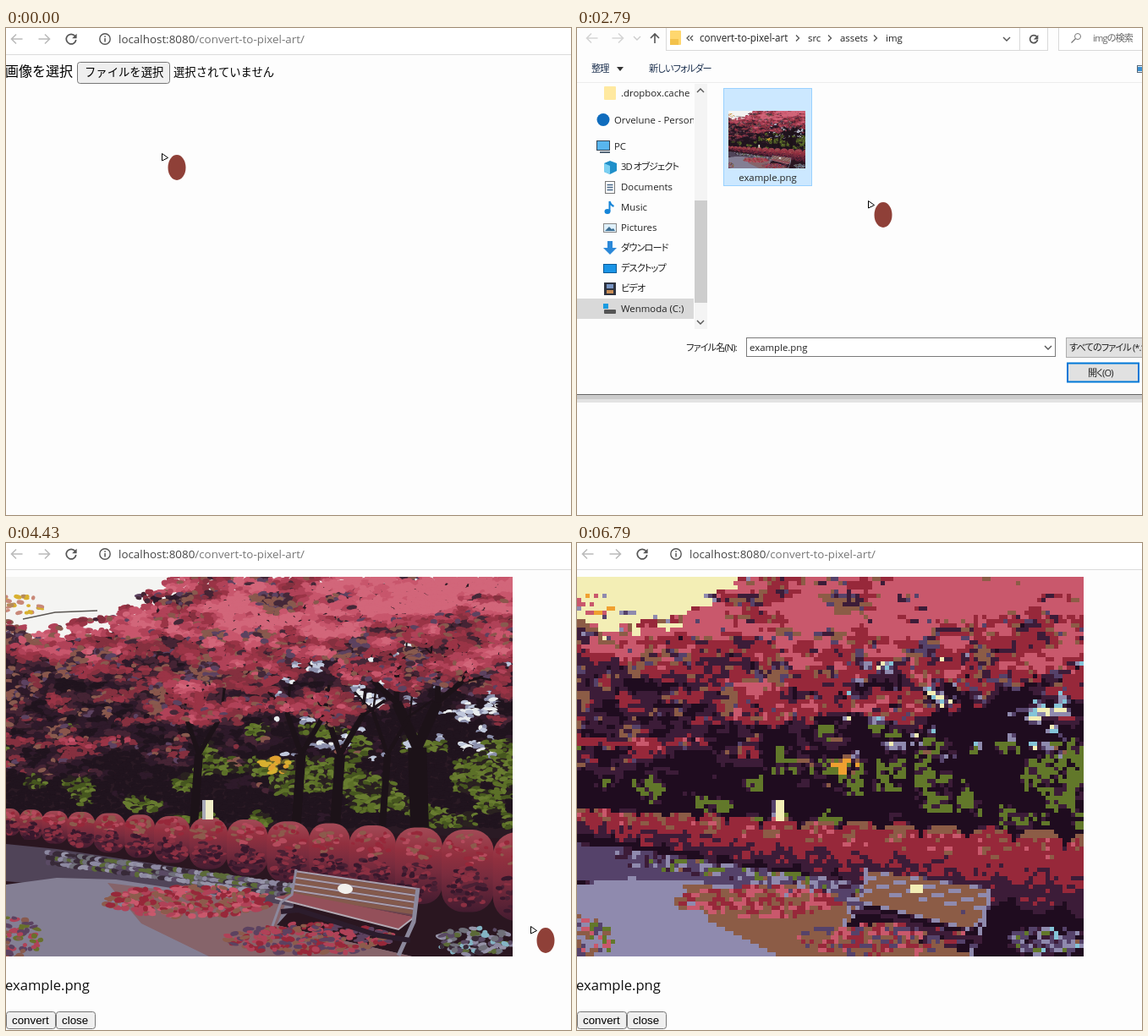
Recreate the animation shown at these times as an HTML page with a canvas. Size 668 by 576 pixels, loop 7040 ms.

```html
<!DOCTYPE html>
<html lang="ja">
<head>
<meta charset="utf-8">
<title>Pixel art converter</title>
<style>
html, body { margin: 0; width: 100%; height: 100%; overflow: hidden; background: #fdfdfd; }
#stage { position: relative; width: 668px; height: 576px; overflow: hidden; background: #fdfdfd; }
#stage > *, #dialog > * { position: absolute; left: 0; top: 0; }
svg { overflow: visible; font-family: "Open Sans", "Noto Sans CJK JP", "Noto Sans CJK", sans-serif; }
.ui { font-family: "Liberation Sans", "Noto Sans CJK JP", sans-serif; }
.tight { letter-spacing: -.9px; font-feature-settings: "palt"; }
#stage > canvas { top: 40px; width: 599px; height: 449px; }
#pixels { image-rendering: pixelated; }
#dialog { width: 668px; height: 576px; transform-origin: 302px 177px; }
#dialog > #thumb { left: 179px; top: 98px; width: 91px; height: 68px; }
</style>
</head>
<body>
<div id="stage">
  <svg id="page" width="668" height="576"></svg>
  <canvas id="photo" width="599" height="449"></canvas>
  <canvas id="pixels" width="120" height="90"></canvas>
  <div id="dialog">
    <svg id="shell" width="668" height="576"></svg>
    <svg id="body" width="668" height="576"></svg>
    <canvas id="thumb" width="182" height="136"></canvas>
  </div>
  <svg id="pointer" width="40" height="40">
    <path d="M.5 .5V9L7.5 5.5Z" fill="#fff" stroke="#000"/>
    <ellipse cx="18" cy="17" rx="10.5" ry="15" fill="#8f4038"/>
  </svg>
</div>
<script>
const $ = id => document.getElementById(id);

// ---------- markup helpers ----------
const text = (x, y, s, size = 11.4, fill = '#222', extra = '') =>
  `<text x="${x}" y="${y + size * .36}" font-size="${size}" fill="${fill}" ${extra}>${s}</text>`;
const kana = (x, y, s, fill) => text(x, y, s, 11.2, fill, 'class="tight"');
const rect = (x, y, w, h, fill, extra = '') =>
  `<rect x="${x}" y="${y}" width="${w}" height="${h}" fill="${fill}" ${extra}/>`;
const box = (x, y, w, h, fill, line, r = 0, extra = '') =>
  rect(x + .5, y + .5, w - 1, h - 1, fill, `stroke="${line}" rx="${r}" ${extra}`);
const line = (d, color, w = 1.3) => `<path d="${d}" fill="none" stroke="${color}" stroke-width="${w}"/>`;
const arrow = (x, y, dir, color, r = 6.5) =>
  line(`M${x - r} ${y}h${2 * r}M${x + dir * (r - 5.5)} ${y - 5.5}l${dir * 5.5} 5.5l${-dir * 5.5} 5.5`, color, 1.6);
const next = (x, y) => line(`M${x - 2} ${y - 3.5}l3.5 3.5l-3.5 3.5`, '#555');
const vee = (x, y, up, color = '#555', w = 1.4) =>
  line(`M${x - 4} ${y + (up ? 2 : -2)}l4 ${up ? -4 : 4}l4 ${up ? 4 : -4}`, color, w);
const reload = (x, y, r, color) =>
  line(`M${x + r * .8} ${y - r * .6}A${r} ${r} 0 1 0 ${x + r} ${y + 1}`, color, 1.7) +
  `<path d="M${x + r + .8} ${y - r - .5}v5.5h-5.5z" fill="${color}"/>`;
const button = (id, x, y, w, h, label, pad) =>
  box(x, y, w, h, '#efefef', '#767676', 3, `id="${id}"`) +
  text(x + pad, y + h / 2 - .3, label, 13.33, '#000', 'class="ui"');

// ---------- browser page ----------
$('page').innerHTML =
  rect(0, 0, 668, 31, '#fff') + rect(0, 31, 668, 1, '#dcdcdc') +
  arrow(13, 13, -1, '#bbb') + arrow(45, 13, 1, '#bbb') + reload(77, 13, 5.8, '#555') +
  '<circle cx="117" cy="13" r="6.2" fill="none" stroke="#555" stroke-width="1.4"/>' +
  rect(116.3, 12, 1.5, 4.5, '#555') + rect(116.3, 9.3, 1.5, 1.6, '#555') +
  text(133, 13, 'localhost:8080<tspan fill="#777">/convert-to-pixel-art/</tspan>', 13.4, '#444') +
  '<g id="form">' + text(-1, 51, '画像を選択', 16, '#000') +
  button('choose', 84, 40, 110, 26, 'ファイルを選択', 9) +
  text(198, 52.5, '選択されていません', 13.33, '#000') + '</g>' +
  '<g id="result">' + text(-1, 523, 'example.png', 16.6, '#111') +
  button('convert', 0, 554, 59, 21, 'convert', 7) + button('close', 59, 554, 47, 21, 'close', 7) + '</g>';

// ---------- file dialog ----------
$('shell').innerHTML =
  rect(-1, 425, 1000, 18, '#000', 'opacity=".1"') + rect(-1, 425, 1000, 14, '#000', 'opacity=".1"') +
  box(-2, -60, 1000, 494, '#fff', '#666') + rect(-1, 357, 990, 76, '#e9e9e9') +
  rect(139, 66, 16, 291, '#eaeaea') + rect(139, 204, 15, 121, '#bcbcbc') +
  vee(146, 74, true, '#333', 2) + vee(146, 348, false, '#333', 2) +
  rect(128, 368, 68, 19, '#fff') + rect(200, 364, 368, 26, '#fff') +
  rect(577, 364, 100, 25, '#fff') + rect(577, 394, 90, 26, '#fff');

const icons = [
  rect(32, 69, 14, 16, '#ffe9a0', 'rx="1"'),
  '<circle cx="31" cy="108.5" r="7.5" fill="#0f6cbd"/>',
  box(23, 133, 16, 12, '#58b5ee', '#345') + rect(27, 146, 12, 2, '#567'),
  '<path d="M32 160l7-3 8 3v9l-8 4-7-3z" fill="#1f8fc9"/><path d="M32 160l7 3v10l-7-3z" fill="#7cd0f2"/>',
  box(33, 181, 12, 15, '#fff', '#777') + line('M35.5 185.5h7m-7 3h7m-7 3h7', '#468'),
  '<ellipse cx="36" cy="217" rx="3.5" ry="3" fill="#1685d8"/>' + line('M38.5 217V205q1 4 5 6', '#1685d8', 2),
  box(31, 231, 16, 11, '#dff0fa', '#888') + '<path d="M33 240l5-5 3 3 2-1 2 3z" fill="#3c6f94"/>',
  '<path d="M36 252h6v8h5l-8 8-8-8h5z" fill="#2b88d8"/>',
  box(31, 279, 16, 11, '#1a94e6', '#0b5c99'),
  rect(32, 301, 14, 15, '#2f3440') + rect(35, 303, 8, 5, '#7895c4') + rect(35, 310, 8, 4, '#c98d55'),
  rect(32, 333, 14, 5, '#555', 'rx="1"') + rect(31, 326, 6, 6, '#1a9be0')
];
const rows = ['.dropbox.cache', 'Orvelune - Personal', 'PC', '3D オブジェクト', 'Documents', 'Music',
  'Pictures', 'ダウンロード', 'デスクトップ', 'ビデオ', 'Wenmoda (C:)'];
const rowX = i => i == 1 || i == 2 ? 44 : 52;
const rowY = i => i < 3 ? 77 + 31.5 * i : 92 + 24 * i;
const tree = rows.map((s, i) => icons[i] +
  (/[ァ-ー]/.test(s) ? kana(rowX(i), rowY(i), s) : text(rowX(i), rowY(i), s))).join('');

$('body').innerHTML =
  rect(-1, -59, 990, 492, '#fdfdfd') +
  arrow(18, 12, -1, '#d5d5d5') + arrow(48, 12, 1, '#d5d5d5') + vee(71, 12, false, '#ccc') +
  line('M92 18V7M87 12l5-5 5 5', '#555', 1.6) +
  box(105, -8, 452, 35, '#fff', '#d9d9d9') + rect(523, 0, 1, 26, '#d9d9d9') +
  rect(110, 3, 13, 17, '#ffd76e', 'rx="1"') + rect(110, 13, 10, 7, '#f3c24b') +
  line('M133 9l-3 3 3 3M137 9l-3 3 3 3', '#555') +
  text(145, 12, 'convert-to-pixel-art', 11.7) + next(261, 12) + text(273, 12, 'src') +
  next(299, 12) + text(311, 12, 'assets') + next(353, 12) + text(365, 12, 'img') +
  vee(508, 13) + reload(540, 13, 4.5, '#555') +
  box(569, -8, 300, 35, '#fff', '#d9d9d9') +
  '<circle cx="592" cy="10" r="3.5" fill="none" stroke="#777"/>' + line('M589.5 12.5l-5 5', '#777') +
  kana(610, 12, 'imgの検索', '#666') +
  kana(17, 48, '整理', '#1e3250') + '<path d="M47 46h8l-4 5z" fill="#333"/>' +
  kana(85, 48, '新しいフォルダー', '#1e3250') +
  box(662, 44, 14, 9, '#eaf3fb', '#567') + rect(663, 46, 5, 5, '#3c8fd0') + rect(0, 64, 700, 1, '#ececec') +
  rect(0, 320, 138, 24, '#d9d9d9') +
  `<clipPath id="side"><path d="M0 60H138V356H0z"/></clipPath><g clip-path="url(#side)">${tree}</g>` +
  rect(139, 66, 15, 290, '#f4f4f4') + rect(139, 204, 15, 121, '#cdcdcd') +
  vee(146, 74, true) + vee(146, 348, false) +
  box(173, 71, 105, 116, '#cce8ff', '#99d1ff', 0, 'id="mark"') +
  text(225.5, 177, 'example.png', 11.4, '#222', 'text-anchor="middle"') +
  kana(129, 378, 'ファイル名(N):') + box(200, 366, 366, 23, '#fff', '#7a7a7a') +
  rect(203, 370, 70, 16, '#0078d7', 'id="sel"') +
  text(204, 378, 'example.png', 11.4, '#222', 'id="name"') + vee(557, 378) +
  box(578, 366, 120, 24, '#e1e1e1', '#adadad') + kana(582, 378, 'すべてのファイル (*.*)') +
  rect(580, 396.5, 84, 22, '#e1e1e1', 'stroke="#0078d7" stroke-width="2"') + kana(604, 407.5, '開く(O)');

// ---------- autumn park picture ----------
const g = $('photo').getContext('2d');
g.translate(0, -40);

let seed = 11;
function rnd() {
  seed = seed + 0x6D2B79F5 | 0;
  let v = Math.imul(seed ^ seed >>> 15, 1 | seed);
  v = v + Math.imul(v ^ v >>> 7, 61 | v) ^ v;
  return ((v ^ v >>> 14) >>> 0) / 4294967296;
}
const pick = list => list[rnd() * list.length | 0];
const clamp = (v, lo = 0, hi = 1) => Math.min(hi, Math.max(lo, v));
const bell = (v, width) => Math.exp(-((v / width) ** 2));

// Smooth value noise
function hash(i, j) {
  const v = Math.sin(i * 127.1 + j * 311.7) * 43758.5453;
  return v - Math.floor(v);
}
function noise(x, y) {
  const i = Math.floor(x), j = Math.floor(y);
  const u = (x - i) ** 2 * (3 - 2 * (x - i)), v = (y - j) ** 2 * (3 - 2 * (y - j));
  const top = hash(i, j) * (1 - u) + hash(i + 1, j) * u;
  return top * (1 - v) + (hash(i, j + 1) * (1 - u) + hash(i + 1, j + 1) * u) * v;
}

const leaf = ['#20141e', '#2e1a2a', '#452434', '#85303f', '#9a3446', '#b04258', '#c8566c', '#d2667a'];
const muted = ['#885a4e', '#5c4260', '#8a564c', '#442838'];
const green = ['#5c7028', '#46561f', '#687c30', '#2a2220'];
const pale = ['#e8ecee', '#c0c8dc', '#8c90ac'];

function dab(x, y, color, size = 1) {
  g.fillStyle = color;
  g.beginPath();
  g.ellipse(x, y, size * (2.5 + rnd() * 4), size * (1.8 + rnd() * 1.6), (rnd() - .5) * .7, 0, 6.283);
  g.fill();
}
function scatter(x, y, rx, ry, colors, count, size) {
  while (count-- > 0) {
    const a = rnd() * 6.283, r = Math.sqrt(rnd());
    dab(x + Math.cos(a) * r * rx, y + Math.sin(a) * r * ry, pick(colors), size);
  }
}
function poly(color, ...p) {
  g.fillStyle = color;
  g.beginPath();
  for (let i = 0; i < p.length; i += 2) g.lineTo(p[i], p[i + 1]);
  g.fill();
}
function stroke(color, w, ...p) {
  g.strokeStyle = color;
  g.lineWidth = w;
  g.beginPath();
  for (let i = 0; i < p.length; i += 2) g.lineTo(p[i], p[i + 1]);
  g.stroke();
}

// Leaf brightness: darker downwards, two slanting sunlit boughs, a shaded right side
function light(x, y) {
  return .62 - (y - 60) / 330 +
    .36 * bell(y - 195 + .27 * x, 42) * clamp((x - 170) / 50) +
    .28 * bell(y - 252 + .2 * x, 24) + .3 * bell(x, 130) * bell(y - 115, 24) -
    .32 * bell(x - 510, 75) * bell(y - 235, 70) +
    (noise(x / 34, y / 13) - .5) * .65 + (noise(x / 11 + 50, y / 6) - .5) * .5;
}
const isSky = (x, y) => y < 102 - Math.max(0, x - 122) * .9 + (noise(x / 14, y / 9) - .5) * 36 && x < 200;

function leafColor(x, y, l) {
  const patch = noise(x / 30 + 90, y / 22);
  if (x > 320 && y > 105 && y < 255 && l < .35 && noise(x / 16 + 7, y / 10) > .72) return pick(pale);
  if (y > 215 && l < .3 && patch > .6) return pick(green);
  if (l > .25 && l < .75 && (patch > .7 || rnd() < .12)) return pick(muted);
  return leaf[clamp(Math.floor(l * 8), 0, 7)];
}
function canopy(bottom, least) {
  for (let y = 40; y < bottom; y += 4) {
    for (let x = 0; x < 604; x += 6) {
      const px = x + rnd() * 6, py = y + rnd() * 4, l = light(px, py);
      if (l > least && !isSky(px, py)) dab(px, py, leafColor(px, py, l));
    }
  }
}
function branch(x, y, angle, len, w) {
  if (w < 2) return;
  const ex = x + Math.cos(angle) * len, ey = y - Math.sin(angle) * len;
  stroke('#1c1218', w, x, y, ex, ey);
  for (const turn of [-.45, .4]) branch(ex, ey, angle + turn, len * .62, w * .55);
}
function trees() {
  g.fillStyle = '#f4f4f2';
  g.fillRect(0, 40, 600, 110);
  poly('#2a1a24', 200, 60, 600, 40, 600, 489, 0, 489, 0, 115, 110, 115);
  canopy(335, -9);
  scatter(15, 72, 30, 13, ['#d8b030', '#b48a5c', '#c98878'], 24, .8);
  stroke('#5a5652', 1.5, 20, 90, 58, 82, 108, 80);
  scatter(318, 263, 20, 9, ['#e0a030', '#d8b030', '#6c6428'], 24);
  branch(489, 337, 1.6, 95, 22);
  for (const x of [222, 343, 389, 445]) branch(x, 335, 1.5, 85, 8 + x % 5);
  canopy(215, .42);
}

function hedge() {
  poly('#2a1620', 0, 322, 600, 350, 600, 489, 0, 489);
  for (let a = -12; a < 600;) {
    const w = 22 + a * .07 + rnd() * 8, x = a + w / 2;
    const top = 314 + x * .046, h = 32 + x * .12;
    const fill = g.createLinearGradient(0, top, 0, top + h);
    fill.addColorStop(0, '#a24a56');
    fill.addColorStop(.3, '#92303f');
    fill.addColorStop(.55, '#7a2c3e');
    fill.addColorStop(1, '#441c30');
    g.fillStyle = fill;
    g.beginPath();
    g.roundRect(a, top, w + 1, h, w / 2.4);
    g.fill();
    scatter(x, top + h * .25, w * .42, h * .2, ['#b44a5c', '#8c5a4c', '#97283a'], w * .5, .8);
    scatter(x, top + h * .7, w * .42, h * .25, ['#8c3042', '#4a2034', '#38182c'], w, .8);
    a += w;
  }
  g.fillStyle = '#f0ecc8';
  g.fillRect(232, 304, 13, 23);
  g.fillStyle = '#a8a8b8';
  g.fillRect(232, 304, 4, 23);
}

function ground() {
  const stone = ['#8c88a0', '#9694a8', '#5c6a38', '#5a4a64', '#70707a', '#382a38'];
  poly('#504458', 0, 356, 60, 362, 340, 404, 340, 430, 0, 400);
  for (let x = 50; x < 345; x += 5) {
    for (let k = 0; k < 3; k++) dab(x, 366 + (x - 50) * .135 + k * 6, pick(stone));
  }
  poly('#847f94', 0, 404, 60, 396, 130, 398, 340, 430, 320, 452, 480, 489, 0, 489);
  poly('#86646a', 120, 402, 330, 428, 320, 452, 480, 489, 240, 489, 160, 450);
  scatter(215, 424, 100, 18, ['#c9586c', '#b04258', '#97283a', '#8c5c4c'], 330);
  scatter(360, 468, 100, 18, ['#8c5c4c', '#b04258', '#97283a', '#5c4260'], 260);
  scatter(8, 468, 34, 26, ['#885a4e', '#b04258', '#5c4260', '#68702c'], 90);
  scatter(555, 471, 45, 16, [...stone, '#84b4c4'], 110);
}

function bench() {
  poly('#6a4450', 342, 388, 487, 409, 483, 442, 338, 415);
  for (let i = 0; i < 4; i++) {
    stroke('#845a4c', 5, 341 - i, 392 + i * 7.5, 486 - i, 413 + i * 8);
    stroke('#a8a0ae', 2.2, 341 - i, 388 + i * 7.5, 486 - i, 409 + i * 8);
  }
  poly('#94505a', 318, 419, 340, 414, 482, 442, 464, 457);
  stroke('#b4aab4', 2, 318, 420, 464, 457, 482, 443);
  stroke('#8c889c', 5, 487, 408, 482, 448, 464, 488);
  stroke('#8c889c', 3, 343, 386, 338, 416, 325, 425, 315, 453);
  stroke('#2c1c2c', 6, 325, 436, 345, 434, 440, 464, 478, 470);
  g.fillStyle = '#f2f0ec';
  g.beginPath();
  g.ellipse(401, 409, 9, 6, .1, 0, 6.283);
  g.fill();
}

trees();
hedge();
ground();
bench();
$('thumb').getContext('2d').drawImage($('photo'), 0, 0, 182, 136);

// ---------- reduce to blocks in a small palette ----------
function pixelate() {
  const hues = ['f3eeb5', 'c9586c', '97283a', '1f0c1f', '3c1c38', '8c5c46', '55426a', '8f8aae', '62782a', 'f0a030', '84c4d8']
    .map(h => [0, 2, 4].map(i => parseInt(h.slice(i, i + 2), 16)));
  const c = $('pixels').getContext('2d');
  c.drawImage($('photo'), 0, 0, 120, 90);
  const img = c.getImageData(0, 0, 120, 90), d = img.data;
  const gap = (h, i) => h.reduce((sum, v, k) => sum + (v - d[i + k]) ** 2, 0);
  for (let i = 0; i < d.length; i += 4) {
    d.set(hues.reduce((a, b) => gap(b, i) < gap(a, i) ? b : a), i);
  }
  c.putImageData(img, 0, 0);
}
pixelate();

// ---------- timeline ----------
const LOOP = 7040, STEP = 60;
// Pointer moves: start, end, x, y
const moves = [[190, 870, 184, 57], [930, 1250, 152, 57], [2000, 2370, 215, 115], [2490, 3670, 629, 400],
  [4150, 4430, 620, 453], [4430, 5150, 38, 563], [5770, 6040, 44, 590]];
const ramp = (a, b, t) => clamp((t - a) / (b - a));

function pointerAt(t) {
  let x = 184, y = 148;
  for (const [a, b, tx, ty] of moves) {
    const k = 1 - (1 - ramp(a, b, t)) ** 1.5;
    x += (tx - x) * k;
    y += (ty - y) * k;
  }
  return `translate(${Math.round(x)}px,${Math.round(y)}px)`;
}
const show = (id, on) => $(id).style.visibility = on ? 'visible' : 'hidden';
const paint = (id, fill) => $(id).setAttribute('fill', fill);

function draw(time) {
  const t = Math.floor((time - 50) / STEP) * STEP + 50;
  const done = t >= 3830, picked = t >= 2510, retype = t >= 3230, converted = t >= 5150;
  show('form', !done);
  show('result', done);
  show('photo', done && !converted);
  show('pixels', converted);
  paint('choose', t >= 800 ? '#e5e5e5' : '#efefef');
  paint('convert', converted && t < 5900 ? '#e5e5e5' : '#efefef');

  const opening = ramp(1470, 1800, t);
  const seen = done ? 1 - ramp(3740, 3950, t) : 1 - (1 - opening) ** 2;
  $('dialog').style.opacity = seen;
  $('dialog').style.transform = `scale(${1 - .042 * (1 - seen)})`;
  $('body').style.opacity = $('thumb').style.opacity = ramp(.45, 1, opening);
  show('mark', picked);
  show('name', picked);
  show('sel', retype);
  paint('mark', retype ? '#d9d9d9' : '#cce8ff');
  paint('name', retype ? '#fff' : '#222');

  $('pointer').style.transform = pointerAt(t);
}
const start = performance.now();
function tick() {
  draw((performance.now() - start) % LOOP);
  requestAnimationFrame(tick);
}
tick();
</script>
</body>
</html>
```
